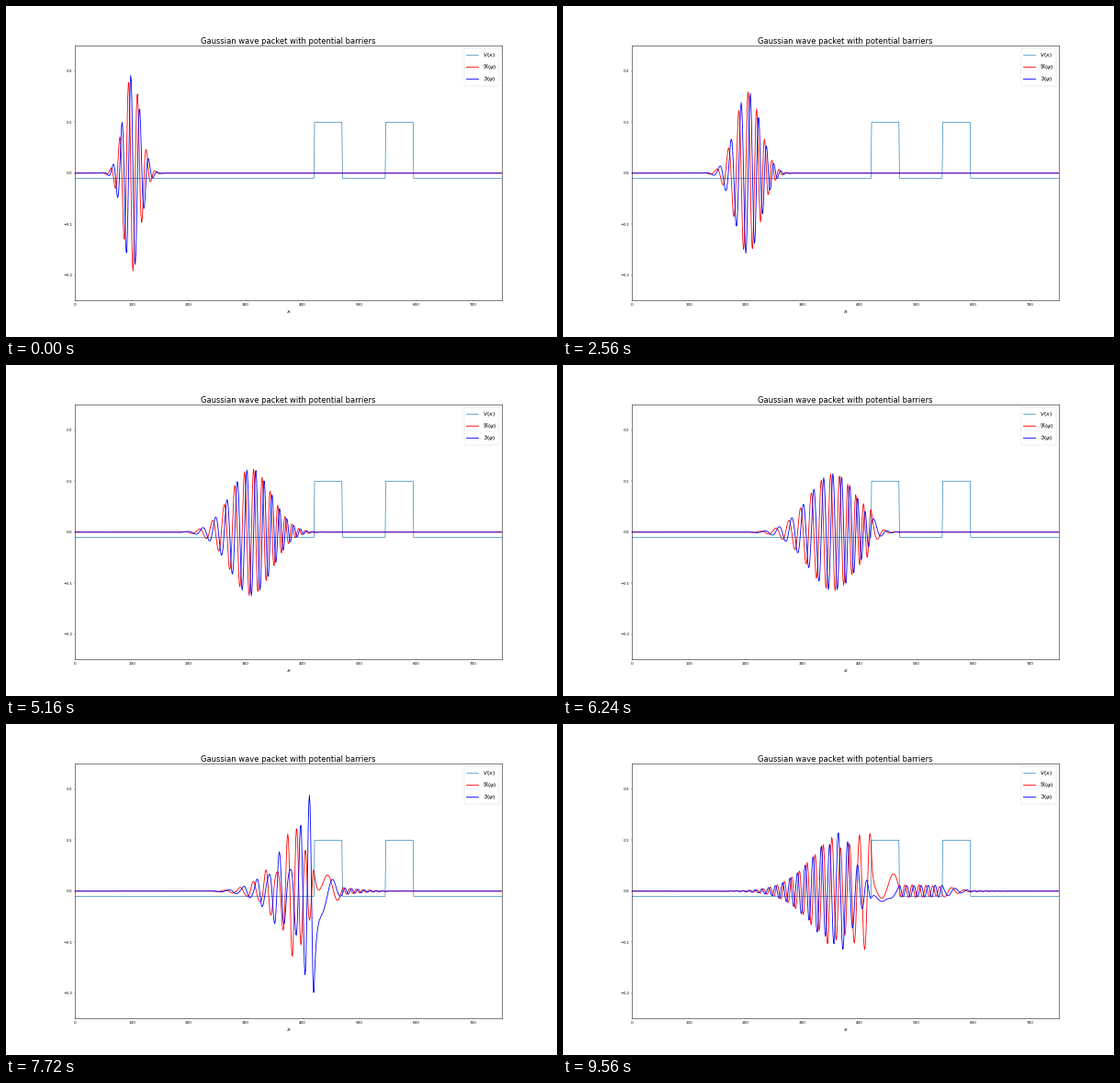
A matplotlib script for the animation above (9.6 s loop, 600 by 360 pixels).

```python
import numpy as np
import matplotlib.pyplot as plt
from matplotlib.animation import FuncAnimation

FRAMES = 240
INTERVAL = 40        # ms
TOTAL_TIME = 1000    # natural units, hbar = m = dx = 1
X0, WIDTH, K0 = 100, 15, 0.4

x = np.arange(751)


def potential(x):
    inside = ((x > 420) & (x < 470)) | ((x > 545) & (x < 595))
    return np.where(inside, 0.1, -0.01)


def evolve(psi, v, times):
    """Propagate psi exactly with the eigenmodes of the lattice Hamiltonian."""
    hop = np.full(len(v) - 1, -0.5)
    energy, modes = np.linalg.eigh(
        np.diag(1 + v) + np.diag(hop, 1) + np.diag(hop, -1))
    weights = modes.T @ psi
    return modes @ (weights[:, None] * np.exp(-1j * np.outer(energy, times)))


v = potential(x)
packet = (np.pi * WIDTH**2) ** -0.25 * np.exp(
    -(x - X0) ** 2 / (2 * WIDTH**2) + 1j * K0 * x)
waves = evolve(packet, v, np.arange(FRAMES) * TOTAL_TIME / FRAMES)

fig, ax = plt.subplots(figsize=(20, 12), dpi=30)
ax.plot(x, v, color="tab:blue", lw=1.5, label=r"$V(x)$")
real_line, = ax.plot(x, waves[:, 0].real, "r", lw=2, label=r"$\Re(\psi)$")
imag_line, = ax.plot(x, waves[:, 0].imag, "b", lw=2, label=r"$\Im(\psi)$")

ax.set_xlim(0, 750)
ax.set_ylim(-0.25, 0.25)
ax.set_yticks([-0.2, -0.1, 0.0, 0.1, 0.2])
ax.set_title("Gaussian wave packet with potential barriers", fontsize=20)
ax.set_xlabel("$x$", fontsize=15)
ax.legend(loc="upper right", fontsize=15)
for spine in ax.spines.values():
    spine.set_linewidth(1.2)


def update(i):
    real_line.set_ydata(waves[:, i].real)
    imag_line.set_ydata(waves[:, i].imag)
    return real_line, imag_line


anim = FuncAnimation(fig, update, frames=FRAMES, interval=INTERVAL,
                     repeat=True, repeat_delay=0, cache_frame_data=False)
plt.show()
```
